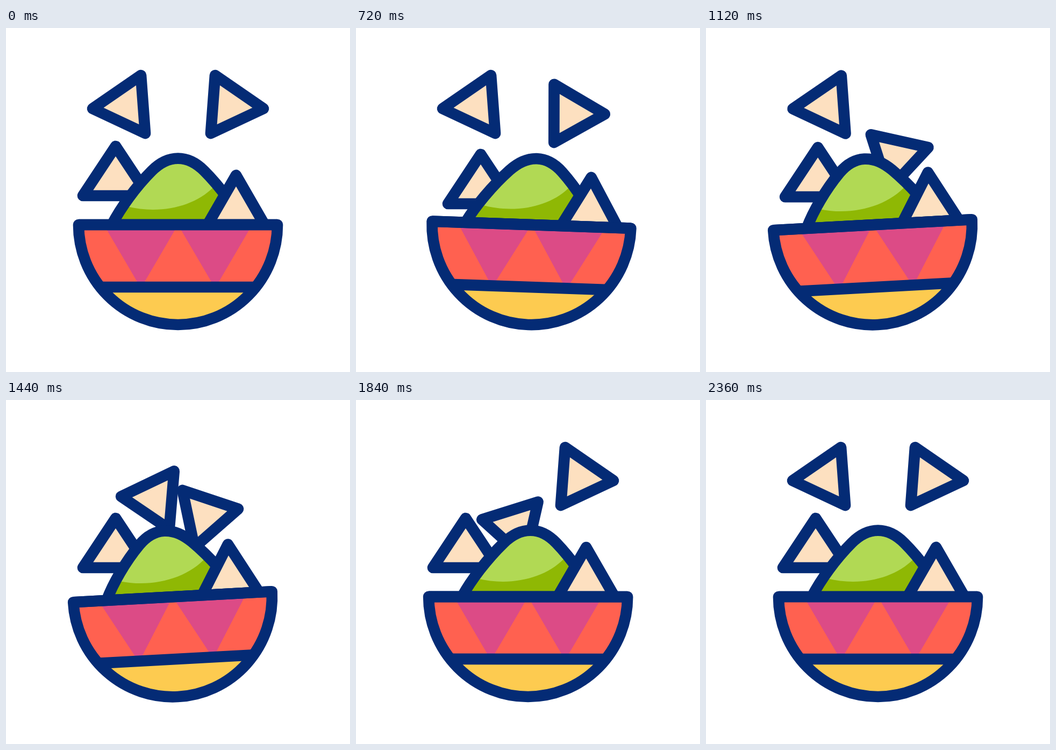
An HTML page with a canvas that plays this animation: 640 by 640 pixels, repeating every 2.44 s.

```html
<!DOCTYPE html>
<html lang="en">
<head>
<meta charset="utf-8">
<title>Chips and dip</title>
<style>
  html, body { margin: 0; width: 100%; height: 100%; overflow: hidden; background: #fff; }
  canvas { display: block; width: 100vw; height: 100vh; }
</style>
</head>
<body>
<canvas id="stage" width="640" height="640"></canvas>
<script>
const ctx = document.getElementById('stage').getContext('2d');
const LOOP = 2440, SWING = 180, STROKE = 20.7;
const NAVY = '#042b75', CREAM = '#fde0c0', RED = '#ff6150', PINK = '#dc4b86';
const YELLOW = '#fdcb50', GREEN = '#b1d954', DARK_GREEN = '#8fb804';

const rad = deg => deg * Math.PI / 180;

// Eased 0 to 1 between two times
function ramp(t, from, to) {
  const u = Math.min(1, Math.max(0, (t - from) / (to - from)));
  return u * u * (3 - 2 * u);
}

// Swings up at one time and back at another
const swing = (t, on, off) => ramp(t, on, on + SWING) - ramp(t, off, off + SWING);

const tilt = t => 2 * swing(t, 390, 920) - 3.1 * swing(t, 920, 1440)
  + 3 * swing(t, 1440, 1740) - 2 * swing(t, 1740, 2110);

function polygon(...points) {
  const path = new Path2D();
  points.forEach(([x, y]) => path.lineTo(x, y));
  path.closePath();
  return path;
}

function fill(path, color) {
  ctx.fillStyle = color;
  ctx.fill(path);
}

function outlined(path, color) {
  fill(path, color);
  ctx.stroke(path);
}

function isolated(draw) {
  ctx.save();
  draw();
  ctx.restore();
}

function turnAbout(x, y, degrees) {
  ctx.translate(x, y);
  ctx.rotate(rad(degrees));
  ctx.translate(-x, -y);
}

const flyingChip = polygon([389, 88], [479, 150], [381, 196]);
const sideChip = polygon([204, 220], [265, 312], [143, 312]);
const frontChip = polygon([428, 274], [481, 366], [375, 366]);
const triangles = [182, 320].map(x => polygon([x, 366], [x + 138, 366], [x + 69, 484]));
const shade = new Path2D('M180 318L225 332C285 347 350 333 386 296L480 260V380H180Z');
const bowl = new Path2D('M135 366H505A185 186 0 0 1 135 366Z');
const bands = new Path2D('M135 366H505M180 482H460');

// Approach until contact, plunge into the dip, then fly home
function drawFlyingChip(t, contact, reach, turn) {
  const approach = ramp(t, contact - 340, contact);
  const plunge = ramp(t, contact, contact + 200);
  const away = 1 - ramp(t, contact + 320, contact + 910);
  const part = share => away * (share * approach + (1 - share) * plunge);
  ctx.translate(-reach * part(0.7), 96 * part(0.41));
  turnAbout(416.3, 144.7, -turn * part(0.5));
  outlined(flyingChip, CREAM);
}

function moundPath(lean) {
  const p = (x, y) => [x + lean * (366 - y) / 123, y];
  const path = new Path2D();
  path.moveTo(...p(197, 366));
  path.bezierCurveTo(...p(213, 335), ...p(241, 296), ...p(271, 266));
  path.bezierCurveTo(...p(287, 250), ...p(303, 242.7), ...p(320, 242.7));
  path.bezierCurveTo(...p(337, 242.7), ...p(353, 250), ...p(369, 266));
  path.bezierCurveTo(...p(399, 296), ...p(427, 335), ...p(443, 366));
  path.closePath();
  return path;
}

function drawMound(lean) {
  const mound = moundPath(lean);
  fill(mound, GREEN);
  isolated(() => {
    ctx.clip(mound);
    fill(shade, DARK_GREEN);
  });
  ctx.stroke(mound);
}

function drawBowl() {
  fill(bowl, RED);
  triangles.forEach(path => fill(path, PINK));
  isolated(() => {
    ctx.clip(bowl);
    ctx.fillStyle = YELLOW;
    ctx.fillRect(130, 482, 380, 80);
  });
  ctx.stroke(bands);
  ctx.stroke(bowl);
}

function draw(t) {
  ctx.fillStyle = '#fff';
  ctx.fillRect(0, 0, 640, 640);
  ctx.strokeStyle = NAVY;
  ctx.lineWidth = STROKE;
  ctx.lineJoin = 'round';
  ctx.lineCap = 'butt';

  isolated(() => {
    const slide = ramp(t, 0, 360) - ramp(t, 840, 1210);
    ctx.translate(28 * slide, 15 * slide);
    outlined(sideChip, CREAM);
  });
  isolated(() => drawFlyingChip(t, 920, 63, 22));
  isolated(() => {
    ctx.translate(640, 0);
    ctx.scale(-1, 1);
    drawFlyingChip(t, 1440, 76, 18);
  });

  isolated(() => {
    turnAbout(320, 552, tilt(t));
    // The mound sways slightly behind the bowl
    drawMound(2.9 * tilt(t - 35));
    outlined(frontChip, CREAM);
    drawBowl();
  });
}

const start = performance.now();
function tick() {
  draw((performance.now() - start) % LOOP);
  requestAnimationFrame(tick);
}
tick();
</script>
</body>
</html>
```
